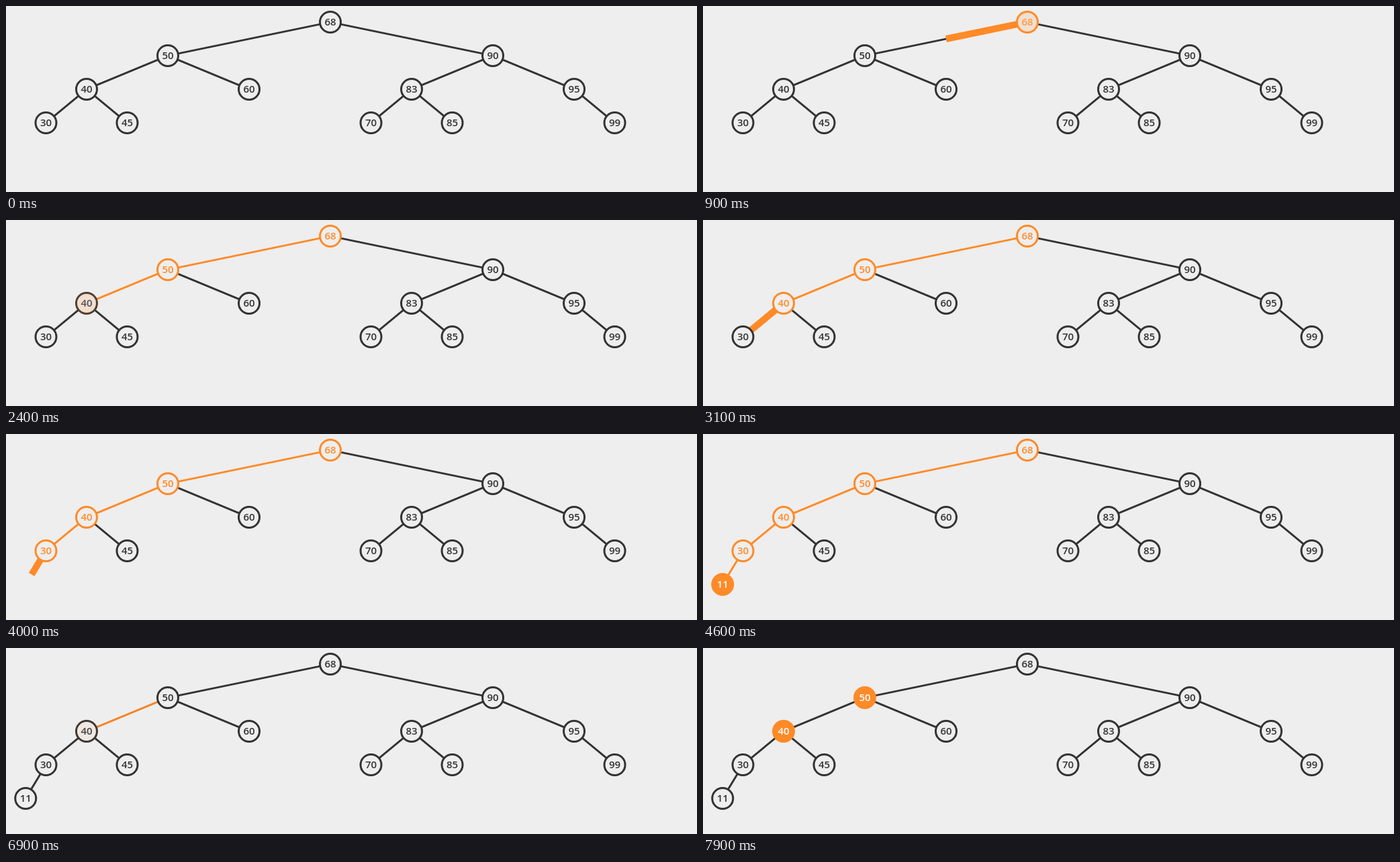
An HTML page with a canvas that plays this animation: 1029 px wide and 277 px high, repeating every 8 s.

```html
<!DOCTYPE html>
<html lang="en">
<head>
<meta charset="utf-8">
<title>Tree insertion</title>
<style>
  html, body { margin: 0; width: 100%; height: 100%; overflow: hidden; background: #eee; }
  canvas { display: block; }
</style>
</head>
<body>
<canvas id="stage" width="1029" height="277"></canvas>
<script>
const ctx = document.getElementById('stage').getContext('2d');
const LOOP = 8000, STEP = 100, RADIUS = 15.5, LINE = 3, THICK = 10;
const BG = [238, 238, 238], DARK = [51, 51, 51], ORANGE = [255, 138, 39], WHITE = [255, 255, 255];

// Node look: stroke, fill, text and opacity.
const look = (stroke, fill, text, alpha = 1) => [...stroke, ...fill, ...text, alpha];
const PLAIN = look(DARK, BG, DARK);
const HOT = look(ORANGE, ORANGE, WHITE);
const PASSED = look(ORANGE, BG, ORANGE);
const HIDDEN = look(ORANGE, ORANGE, WHITE, 0);

// Edge look: colour and opacity.
const E_PLAIN = [...DARK, 1], E_HOT = [...ORANGE, 1], E_HIDDEN = [...ORANGE, 0];

// Stepped transitions; SOFT stops just short of its goal.
const CUT = { steps: 1, offset: 1, span: 1 };
const SOFT = { steps: 3, offset: 100, span: 400 };
const FULL = { steps: 3, offset: 100, span: 300 };
const LONG = { steps: 4, offset: 66, span: 400 };

const ease = x => x >= 1 ? 1 : x < 0.5 ? 4 * x ** 3 : 1 - 4 * (1 - x) ** 3;
const mix = (a, b, p) => a.map((v, i) => v + (b[i] - v) * p);
const rgb = c => `rgb(${c.slice(0, 3).map(Math.round).join(',')})`;

const nodes = new Map(), edges = [];

function addNode(label, depth, index, parent) {
  const gap = 968 / 2 ** depth;
  nodes.set(label, {
    label, x: -1 + gap * (index + 0.5), y: 24 + 50 * depth, base: PLAIN, changes: []
  });
  if (parent) edges.push({ from: parent, to: label, base: E_PLAIN, changes: [], grow: null });
}

addNode(68, 0, 0);
addNode(50, 1, 0, 68);
addNode(90, 1, 1, 68);
addNode(40, 2, 0, 50);
addNode(60, 2, 1, 50);
addNode(83, 2, 2, 90);
addNode(95, 2, 3, 90);
addNode(30, 3, 0, 40);
addNode(45, 3, 1, 40);
addNode(70, 3, 4, 83);
addNode(85, 3, 5, 83);
addNode(99, 3, 7, 95);
addNode(11, 4, 0, 30);

const edgeTo = label => edges.find(e => e.to === label);
const change = (part, at, goal, mode) => part.changes.push({ at, goal, mode });
const setNode = (label, at, goal, mode) => change(nodes.get(label), at, goal, mode);
const setEdge = (label, at, goal, mode) => change(edgeTo(label), at, goal, mode);

function descend(label, child, visit, leave, mode) {
  setNode(label, visit, HOT, mode);
  setNode(label, leave, PASSED, FULL);
  edgeTo(child).grow = leave;
  setEdge(child, leave + 4 * STEP, E_HOT, CUT);
}

nodes.get(11).base = HIDDEN;
edgeTo(11).base = E_HIDDEN;

// Search downwards, then insert.
descend(68, 50, 500, 800, FULL);
descend(50, 40, 1400, 1800, SOFT);
descend(40, 30, 2400, 2800, FULL);
descend(30, 11, 3300, 3800, LONG);
setNode(11, 4300, HOT, LONG);

for (const label of [68, 50, 40, 30, 11]) {
  setNode(label, 4800, PLAIN, FULL);
  if (label !== 68) setEdge(label, 4800, E_PLAIN, FULL);
}

// Walk back up.
setNode(30, 5300, HOT, FULL);
setNode(30, 5700, PLAIN, LONG);
setEdge(30, 5700, E_HOT, LONG);
setNode(40, 6200, HOT, LONG);
setEdge(30, 6200, E_PLAIN, LONG);
setNode(40, 6700, PLAIN, SOFT);
setEdge(40, 6700, E_HOT, SOFT);
setNode(50, 7200, HOT, FULL);
setEdge(40, 7200, E_PLAIN, FULL);
setNode(40, 7700, HOT, FULL);

function lookAt(part, time) {
  return part.changes.reduce((now, { at, goal, mode }) => {
    if (time < at) return now;
    const step = Math.min(Math.floor((time - at) / STEP), mode.steps - 1);
    return mix(now, goal, ease((step * STEP + mode.offset) / mode.span));
  }, part.base);
}

function line(x1, y1, x2, y2, color, width) {
  ctx.strokeStyle = rgb(color);
  ctx.lineWidth = width;
  ctx.beginPath();
  ctx.moveTo(x1, y1);
  ctx.lineTo(x2, y2);
  ctx.stroke();
}

function drawEdge(edge, time) {
  const a = nodes.get(edge.from), b = nodes.get(edge.to);
  const dx = b.x - a.x, dy = b.y - a.y, trim = RADIUS / Math.hypot(dx, dy);
  const point = p => [a.x + dx * p, a.y + dy * p];
  const color = lookAt(edge, time);
  ctx.globalAlpha = color[3];
  line(...point(trim), ...point(1 - trim), color, LINE);
  ctx.globalAlpha = 1;

  const step = edge.grow === null ? -1 : Math.floor((time - edge.grow) / STEP);
  if (step >= 0 && step < 4) {
    const end = trim + (1 - 2 * trim) * ease((step + 1) / 4);
    line(...point(trim), ...point(end), ORANGE, THICK);
  }
}

function drawNode(node, time) {
  const c = lookAt(node, time);
  ctx.globalAlpha = c[9];
  ctx.beginPath();
  ctx.arc(node.x, node.y, RADIUS, 0, 2 * Math.PI);
  ctx.fillStyle = rgb(c.slice(3));
  ctx.fill();
  ctx.strokeStyle = rgb(c);
  ctx.lineWidth = LINE;
  ctx.stroke();
  ctx.fillStyle = rgb(c.slice(6));
  ctx.fillText(node.label, node.x, node.y + 5);
  ctx.globalAlpha = 1;
}

function draw(time) {
  ctx.fillStyle = rgb(BG);
  ctx.fillRect(0, 0, 1029, 277);
  ctx.font = '600 15px "Open Sans", "Noto Sans", sans-serif';
  ctx.textAlign = 'center';
  edges.forEach(e => drawEdge(e, time));
  nodes.forEach(n => drawNode(n, time));
}

const start = performance.now();
function tick() {
  draw((performance.now() - start) % LOOP);
  requestAnimationFrame(tick);
}
tick();
</script>
</body>
</html>
```
